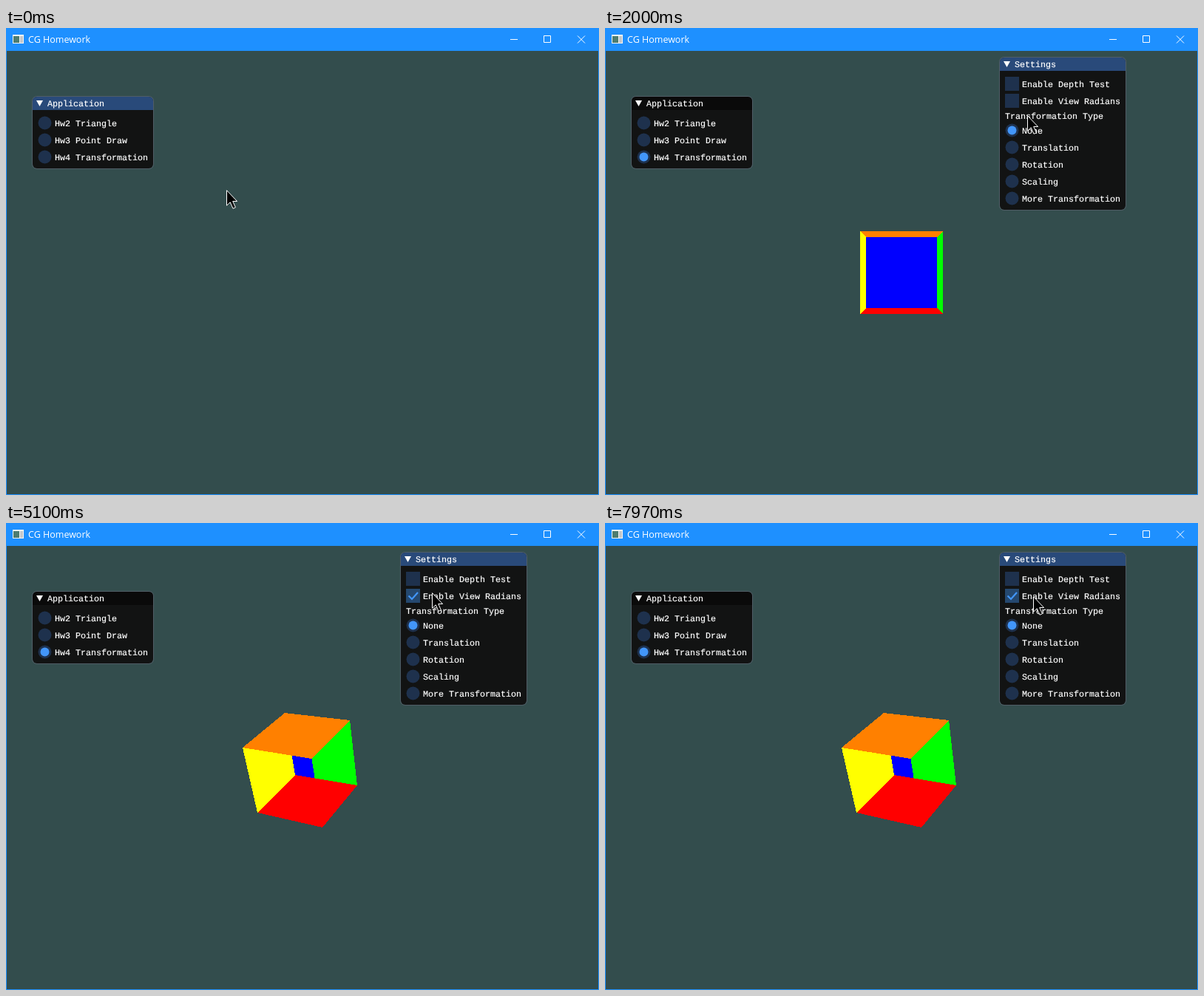
Write an HTML page that moves like this. It is 802 px wide and 632 px high and loops after 8000 ms.

```html
<!DOCTYPE html>
<html lang="en">
<head>
<meta charset="utf-8">
<title>CG Homework</title>
<style>
  html, body { margin: 0; width: 100%; height: 100%; overflow: hidden; background: #334d4d; }
  svg { display: block; width: 802px; height: 632px; }
  text { fill: #fff; white-space: pre; }
  .ui { font: 11.667px "Liberation Mono", "DejaVu Sans Mono", monospace; text-rendering: geometricPrecision;
        stroke: #fff; stroke-width: .2px; }
  .caption { font: 12.5px "Open Sans", "Noto Sans", sans-serif; }
  .mark { fill: #4296fa; }
  .tick { fill: none; stroke: #4296fa; stroke-width: 2.2px; }
  .crisp { shape-rendering: crispEdges; }
</style>
</head>
<body>
<svg id="stage" viewBox="0 0 802 632" xmlns="http://www.w3.org/2000/svg"></svg>
<script>
const LOOP = 8000;
const OPEN = 840;
const stage = document.getElementById('stage');
const COLOR = { idle: '#1e314d', hover: '#25486f', active: '#326bae' };

// Cursor moves: first step, last step, number of steps, end point
const START = [298, 219];
const MOVES = [
  [70, 530, 7, 153, 175],
  [1140, 1920, 11, 566, 129],
  [2000, 2000, 1, 571, 118],
  [2080, 2380, 5, 586, 77],
  [2860, 3150, 5, 571, 164],
  [3320, 3620, 5, 572, 99],
  [5100, 5100, 1, 576, 94],
  [5180, 5340, 3, 586, 77],
  [6730, 6810, 2, 585, 77],
  [7110, 7110, 1, 585, 76],
  [7660, 7970, 5, 579, 99]
];

// Clicks: button down, ring gone, widget released, widget
const CLICKS = [
  [670, 840, 840, 'hw4'],
  [3940, 4020, 4020, 'view'],
  [5640, 5720, 5720, 'depth'],
  [7110, 7190, 7270, 'depth']
];

// Corners: four of the far face, then four of the near face, clockwise
const STRAIGHT = [[345, 275], [457, 275], [457, 387], [345, 387],
                  [353, 283], [449, 283], [449, 379], [353, 379]];
const TURNED = [[377, 257], [465, 267], [475, 355], [391, 341],
                [320, 304], [413.5, 319], [428, 412], [340, 392]];
const FACES = [
  ['blue', '#00f', [4, 5, 6, 7]],
  ['yellow', '#ff0', [0, 3, 7, 4]],
  ['green', '#0f0', [1, 2, 6, 5]],
  ['red', '#f00', [3, 2, 6, 7]],
  ['orange', '#ff8000', [0, 1, 5, 4]]
];

const label = (x, cy, s) => `<text class="ui" x="${x}" y="${cy + 4}">${s}</text>`;

function panel(id, x, y, w, h, title, body) {
  const r = 6;
  return `<g id="${id}">
    <rect x="${x}" y="${y}" width="${w}" height="${h}" rx="${r}" fill="#121313"/>
    <path id="${id}Bar" d="M${x} ${y + 18}V${y + r}q0 ${-r} ${r} ${-r}H${x + w - r}q${r} 0 ${r} ${r}V${y + 18}z"/>
    <rect x="${x - .5}" y="${y - .5}" width="${w + 1}" height="${h + 1}" rx="${r}"
      fill="none" stroke="#6e6e80" stroke-opacity=".5"/>
    <path d="M${x + 5} ${y + 5}h9l-4.5 8z" fill="#fff"/>
    ${label(x + 20, y + 9, title)}${body}</g>`;
}

const widgets = [];

function radio(id, x, cy, s) {
  widgets.push({ id, x, cy, w: 23 + 7 * s.length });
  return `<circle id="${id}" cx="${x + 9.5}" cy="${cy - .5}" r="9"/>
    <circle id="${id}Mark" class="mark" cx="${x + 9.5}" cy="${cy - .5}" r="6"/>` + label(x + 23, cy, s);
}

function checkbox(id, x, cy, s) {
  widgets.push({ id, x, cy, w: 23 + 7 * s.length });
  return `<rect id="${id}" x="${x}" y="${cy - 10}" width="19" height="19"/>
    <path id="${id}Mark" class="tick" d="M${x + 3.5} ${cy - .5}l4.5 4.5 8-9"/>` + label(x + 23, cy, s);
}

const frame = `
  <rect width="802" height="632" fill="#1e90ff"/>
  <rect x="1" y="31" width="800" height="600" fill="#334d4d"/>
  <g class="crisp">
    <rect x="9" y="9" width="15" height="12" fill="#f4f4f4"/>
    <rect x="10" y="11" width="8" height="9" fill="#4d7d70"/>
    <rect x="19" y="11" width="4" height="9" fill="#c4c8cc"/>
  </g>
  <text class="caption" x="30" y="20">CG Homework</text>
  <path d="M682 15.5h10M727.5 10.5h9v9h-9zM773 10.5l10 10M783 10.5l-10 10" fill="none" stroke="#fff"/>`;

const cube = '<g id="cube" class="crisp">' +
  FACES.map(([id, fill]) => `<polygon id="${id}" fill="${fill}"/>`).join('') + '</g>';

const appBody =
  radio('hw2', 43, 129, 'Hw2 Triangle') +
  radio('hw3', 43, 152, 'Hw3 Point Draw') +
  radio('hw4', 43, 175, 'Hw4 Transformation');

const settingsBody =
  checkbox('depth', 541, 76, 'Enable Depth Test') +
  checkbox('view', 541, 99, 'Enable View Radians') +
  label(541, 119, 'Transformation Type') +
  ['None', 'Translation', 'Rotation', 'Scaling', 'More Transformation']
    .map((s, i) => radio('type' + i, 541, 139 + 23 * i, s)).join('');

const pointer = `<g id="pointer">
  <g id="ring" fill="none"><circle cx=".5" cy=".5" r="10.8" stroke="#000"/><circle cx=".5" cy=".5" r="9.8" stroke="#fff"/></g>
  <path d="M.5 .7V21.2L5.2 16.8 9 25.3 12.4 23.8 8.7 15.5H14.6z" fill="#000" stroke="#fff"/></g>`;

stage.innerHTML = frame + cube +
  panel('app', 36, 93, 163, 97, 'Application', appBody) +
  panel('settings', 534, 40, 170, 206, 'Settings', settingsBody) + pointer;

const el = {};
stage.querySelectorAll('[id]').forEach(e => el[e.id] = e);
const show = (id, on) => el[id].setAttribute('visibility', on ? 'inherit' : 'hidden');
const paint = (id, color) => el[id].setAttribute('fill', color);

function tipAt(t) {
  let [x, y] = START;
  for (const [from, to, n, ex, ey] of MOVES) {
    if (t < from) break;
    const gap = n > 1 ? (to - from) / (n - 1) : 1;
    const p = Math.min(n, Math.floor((t - from) / gap + 1e-6) + 1) / n;
    const k = p * p * (3 - 2 * p);
    x += (ex - x) * k;
    y += (ey - y) * k;
  }
  return [Math.round(x), Math.round(y)];
}

function draw(t) {
  const [x, y] = tipAt(t);
  const open = t >= OPEN;
  const turned = t >= 4020;
  const solid = t >= 5720 && t < 7270;
  const held = CLICKS.find(c => t >= c[0] && t < c[2]);

  el.pointer.setAttribute('transform', `translate(${x} ${y})`);
  show('ring', held && t < held[1]);
  show('settings', open);
  show('cube', open);
  paint('appBar', open ? '#0a0a0a' : '#294a7a');
  paint('settingsBar', '#294a7a');

  const marked = { hw4: open, type0: true, view: turned, depth: solid };
  for (const { id, x: left, cy, w } of widgets) {
    const over = x >= left && x < left + w && Math.abs(y - cy) < 9.5;
    paint(id, held && held[3] === id ? COLOR.active : over ? COLOR.hover : COLOR.idle);
    show(id + 'Mark', marked[id]);
  }

  const corners = turned ? TURNED : STRAIGHT;
  for (const [id, , face] of FACES) {
    el[id].setAttribute('points', face.map(i => corners[i]).join(' '));
    show(id, !solid || (id !== 'red' && id !== 'yellow'));
  }
}

const begin = performance.now();
function tick() {
  draw((performance.now() - begin) % LOOP);
  requestAnimationFrame(tick);
}
tick();
</script>
</body>
</html>
```
